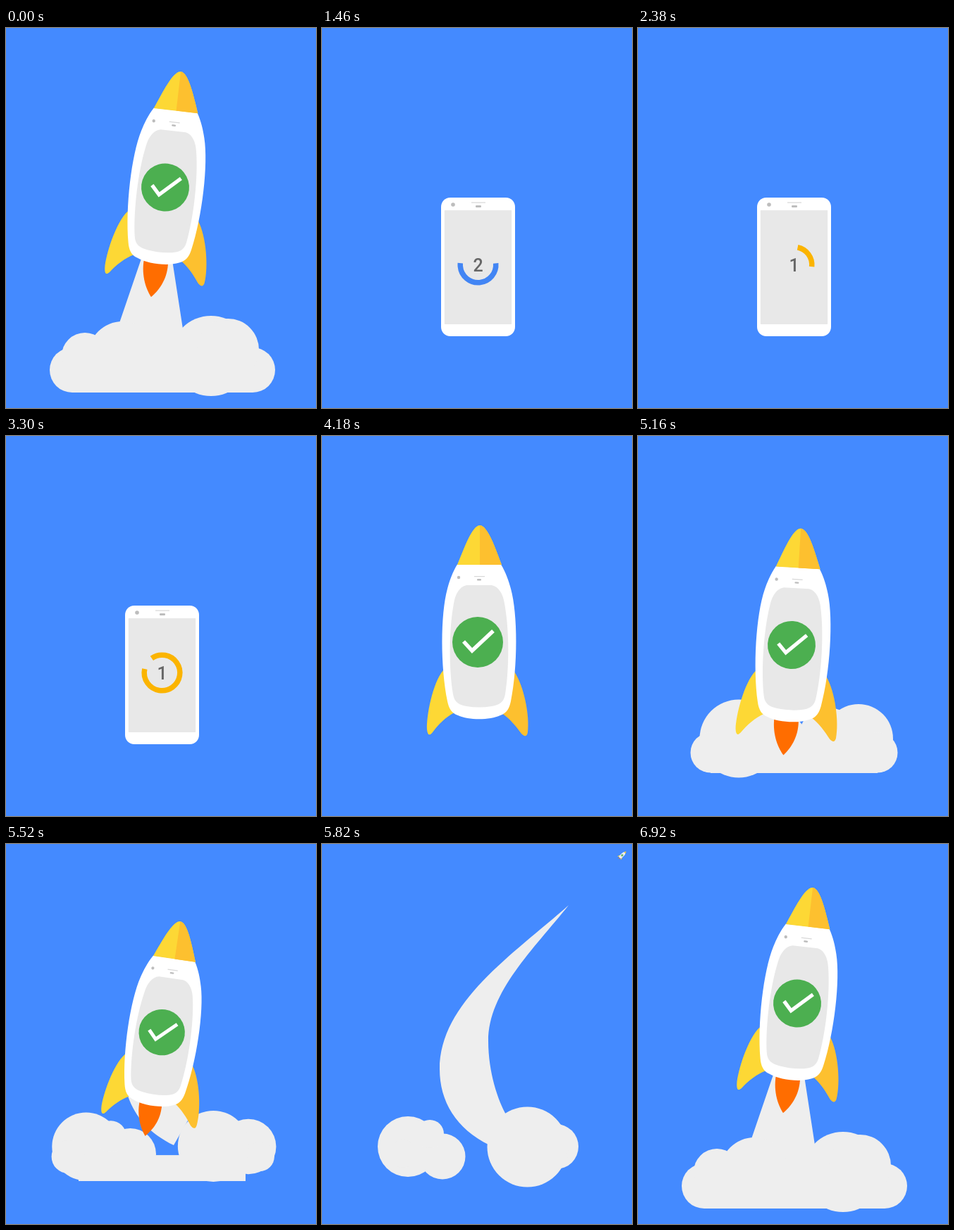
An HTML page with a canvas for the animation above (6.94 s loop, 440 px wide and 540 px high).

```html
<!DOCTYPE html>
<html lang="en">
<head>
<meta charset="utf-8">
<title>Countdown rocket</title>
<style>
  html, body { margin: 0; width: 100%; height: 100%; overflow: hidden; background: #448aff; }
  canvas { display: block; }
</style>
</head>
<body>
<canvas id="stage" width="440" height="540"></canvas>
<script>
const ctx = document.getElementById('stage').getContext('2d');
const LOOP = 6940, TAU = Math.PI * 2;
const COLOR = {
  sky: '#448aff', smoke: '#eeeeee', screen: '#e8e8e8', detail: '#bdbdbd', digit: '#666666',
  light: '#fdd835', dark: '#fdc02f', flame: '#ff6d00', done: '#4caf50',
};
const COUNT = [['3', '#ea4335'], ['2', '#4285f4'], ['1', '#fbb400']];
const COUNT_START = 20, COUNT_END = 3510, COUNT_STEP = 1160;

const clamp = v => Math.max(0, Math.min(1, v));
const lerp = (a, b, p) => a + (b - a) * p;
const span = (t, from, to) => clamp((t - from) / (to - from));
const smooth = p => p * p * (3 - 2 * p);
const outBack = p => 1 + 2.3 * (p - 1) ** 3 + 1.3 * (p - 1) ** 2;
const bezier = (a, b, c, d, s) =>
  a * (1 - s) ** 3 + 3 * b * s * (1 - s) ** 2 + 3 * c * s * s * (1 - s) + d * s ** 3;

function fillPath(color, d) {
  ctx.fillStyle = color;
  ctx.fill(new Path2D(d));
}

function disc(x, y, r, color) {
  ctx.fillStyle = color;
  ctx.beginPath();
  ctx.arc(x, y, Math.max(0, r), 0, TAU);
  ctx.fill();
}

// Left half outlines: top corner, side, bottom corner, towards the bottom centre.
function roundedHalf(w, top, bottom, r) {
  const k = r * 0.45;
  return [[r - w, top], [k - w, top], [-w, top + k], [-w, top + r], [-w, top / 2], [-w, bottom / 2],
    [-w, bottom - r], [-w, bottom - k], [k - w, bottom], [r - w, bottom], [-w / 2, bottom]];
}
const PHONE_BODY = roundedHalf(52.5, -95.5, 101.5, 13);
const PHONE_SCREEN = roundedHalf(47.7, -77.5, 84.5, 1);
const ROCKET_BODY = [[-31, -110.5], [-38, -99], [-42, -87], [-45, -76], [-55, -40], [-55, 35],
  [-45, 84], [-43, 94], [-39, 101], [-30, 104], [-15, 111]];
const ROCKET_SCREEN = [[-18, -81], [-28, -79], [-34, -68], [-36, -55], [-43, -18], [-43, 38],
  [-37, 74], [-35, 86], [-28, 89], [-18, 91], [-6, 93]];

function morphShape(color, from, to, m) {
  const half = from.map(([x, y], i) => [lerp(x, to[i][0], m), lerp(y, to[i][1], m)]);
  const shift = 2 * m;
  const points = [...half, ...half.map(([x, y]) => [-x, y]).reverse()].map(([x, y]) => [x + shift, y]);
  fillPath(color, `M${points[0]}C${points.slice(1).join(' ')}Z`);
}

function scaled(x, y, k, draw) {
  if (k <= 0) return;
  ctx.save();
  ctx.translate(x, y);
  ctx.scale(k, k);
  ctx.translate(-x, -y);
  draw();
  ctx.restore();
}

function drawFins() {
  fillPath(COLOR.light, 'M-49 40C-64 58-73 105-72 124C-71 133-68 133-64 128C-57 118-45 106-33 100Z');
  fillPath(COLOR.dark, 'M52 42C66 63 74 105 71 128C70 135 66 134 62 130C55 120 45 108 34 101Z');
}

function drawNose() {
  fillPath(COLOR.light, 'M-29-110C-19-134-8-166 3-166C14-166 25-134 34-110Z');
  fillPath(COLOR.dark, 'M3-110V-166C14-166 25-134 34-110Z');
}

function drawCheck(r) {
  disc(0, 0, r, COLOR.done);
  const k = r / 36;
  ctx.strokeStyle = '#fff';
  ctx.lineWidth = 5.5 * k;
  ctx.beginPath();
  [[-20, -1], [-8, 12], [22, -16]].forEach(([x, y]) => ctx.lineTo(x * k, y * k));
  ctx.stroke();
}

// m morphs the phone (0) into the rocket (1).
function drawCraft({ x, y, angle = 0, size = 1, m = 0, flame = 0, check = 0 }) {
  ctx.save();
  ctx.translate(x, y);
  ctx.rotate(angle * Math.PI / 180);
  ctx.scale(size, size);
  scaled(0, 103, flame, () =>
    fillPath(COLOR.flame, 'M-18 103C-20 125-12 145-2 157C9 145 19 127 16 103Z'));
  scaled(0, 60, m, drawFins);
  morphShape('#fff', PHONE_BODY, ROCKET_BODY, m);
  morphShape(COLOR.screen, PHONE_SCREEN, ROCKET_SCREEN, m);
  disc(lerp(-35.5, -27, m), lerp(-85.5, -92, m), lerp(2.8, 2.2, m), COLOR.detail);
  ctx.fillStyle = '#d8d8d8';
  ctx.fillRect(lerp(-9.5, -5, m), lerp(-89, -94, m), lerp(20, 15, m), 1.2);
  ctx.fillStyle = COLOR.detail;
  ctx.beginPath();
  ctx.roundRect(lerp(-3.5, -1, m), lerp(-84.5, -90, m), lerp(8, 6, m), lerp(3, 2.4, m), 1.2);
  ctx.fill();
  scaled(2, -110, m, drawNose);
  if (check > 0) drawCheck(check);
  ctx.restore();
}

function drawCountdown(t) {
  const elapsed = (t - COUNT_START) / COUNT_STEP;
  const index = Math.min(2, Math.floor(elapsed));
  const p = elapsed - index;
  const [digit, color] = COUNT[index];
  const start = (p * (336 + 68 * p) - 90) * Math.PI / 180;
  const sweep = Math.min(360, 344 * p ** 0.417) * Math.PI / 180;
  ctx.strokeStyle = color;
  ctx.lineWidth = 7.5;
  ctx.beginPath();
  ctx.arc(221.5, 336.5, 25.3, start, start + sweep);
  ctx.stroke();
  ctx.fillStyle = COLOR.digit;
  ctx.font = '500 25px Roboto, sans-serif';
  ctx.textAlign = 'center';
  ctx.fillText(digit, 221.5, 345.5);
}

// Each puff: x, y, radius at lift-off, then once the rocket has left.
const PUFFS = [
  [143, 430, 55.5, 122, 430, 43], [313, 430, 49, 332, 430, 32], [103, 450, 28.5, 115, 440, 20],
  [340, 450, 28.5, 335, 440, 15], [200, 436, 42, 171, 444, 32.5], [270, 428, 42, 291.5, 430.5, 57],
  [170, 420, 25, 153, 412, 20],
];

function drawClouds(t) {
  const grow = 1 - (1 - span(t, 4840, 5140)) ** 2;
  const part = smooth(span(t, 5160, 5820));
  const fade = 1 - smooth(span(t, 5820, 6290));
  const spread = 1 + 0.2 * Math.sin(Math.PI * part);
  if (!grow || !fade) return;
  for (const [x0, y0, r0, x1, y1, r1] of PUFFS) {
    const x = 220 + (lerp(x0, x1, part) - 220) * spread * grow;
    disc(x, lerp(440, lerp(y0, y1, part), grow), lerp(r0, r1, part) * grow * fade, COLOR.smoke);
  }
  const height = 57 * grow * (1 - span(t, 5400, 5740));
  const width = 237 * grow;
  ctx.fillRect(221.5 - width / 2, lerp(440, 479, grow) - height, width, height);
}

function drawTrail(t, top) {
  const thin = 1 - smooth(span(t, 5830, 6150));
  if (!thin) return;
  ctx.save();
  ctx.beginPath();
  ctx.rect(0, top, 440, 540);
  ctx.clip();
  scaled(350, 87, thin, () => fillPath(COLOR.smoke,
    'M238 428C190 405 167 365 167 320C167 225 270 158 350 87C300 150 236 210 236 280C236 325 250 365 262 386Z'));
  ctx.restore();
}

function drawPoster() {
  fillPath(COLOR.smoke, 'M193 325L147 460V480H260L256 460L236 330Z');
  [[94, 486, 32], [350, 486, 32], [112, 466, 33], [165, 465, 48], [291, 466, 57], [315, 457, 44]]
    .forEach(([x, y, r]) => disc(x, y, r, COLOR.smoke));
  ctx.fillRect(94, 454, 256, 64);
  drawCraft({ x: 226, y: 226.5, angle: 6.6, m: 1, flame: 1, check: 34 });
}

function drawLaunch(t) {
  const lean = smooth(span(t, 4860, 5160));
  const s = span(t, 5300, 5820) ** 2.5;
  const rock = 5.5 * Math.sin(TAU * span(t, 4320, 5120) * 2) * (1 - lean);
  const size = 1 - 0.955 * s ** 1.5;
  const y = bezier(lerp(293, 297, lean), 215, 115, 16, s);
  if (s > 0) drawTrail(t, s < 1 ? y + 95 * size : 0);
  drawClouds(t);
  if (t >= 5860) return;
  drawCraft({
    x: bezier(lerp(221, 218, lean), 215, 320, 426, s), y, size, m: 1,
    angle: 3.5 * lean + 42 * s + rock,
    flame: smooth(span(t, 4600, 4820)) * (1 + 0.06 * Math.sin((t - 5160) / 22)),
    check: lerp(36, 34, lean),
  });
}

function drawScene(t) {
  ctx.fillStyle = COLOR.sky;
  ctx.fillRect(0, 0, 440, 540);
  if (t < 20 || t >= 6920) return drawPoster();
  if (t < COUNT_END) {
    drawCraft({ x: 221.5, y: 336.5 });
    drawCountdown(t);
  } else if (t < 4220) {
    const m = outBack(span(t, COUNT_END, 4180) ** 1.4);
    drawCraft({
      x: lerp(221.5, 221, m), y: lerp(336.5, 293, m), m,
      check: 36 * outBack(span(t, COUNT_END, 3900)),
    });
  } else if (t < 6300) {
    drawLaunch(t);
  }
}

const began = performance.now();
function tick() {
  const t = (performance.now() - began) % LOOP;
  drawScene(Math.floor(t / 20) * 20);
  requestAnimationFrame(tick);
}
tick();
</script>
</body>
</html>
```
